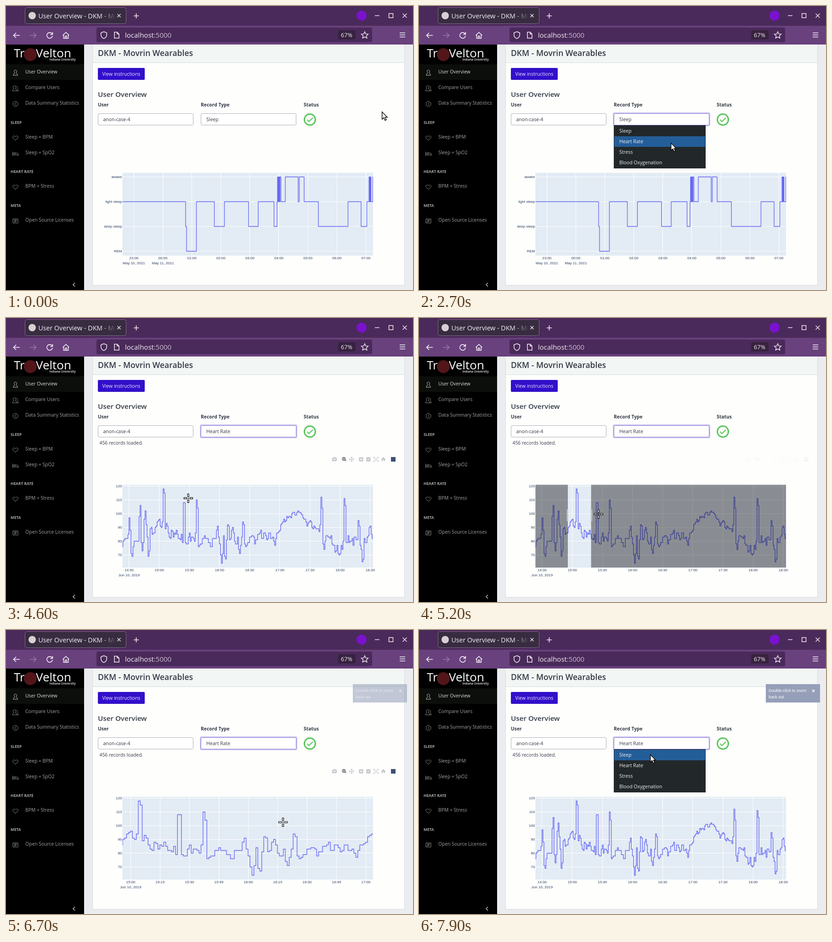
Animation of 886 by 619 pixels, one loop 8 s. Source, as an HTML page with a canvas:

```html
<!DOCTYPE html>
<html lang="en">
<head>
<meta charset="utf-8">
<title>User Overview</title>
<style>
html, body { margin: 0; width: 100%; height: 100%; overflow: hidden; background: #ebecef; }
canvas { display: block; width: 886px; height: 619px; }
</style>
</head>
<body>
<canvas id="stage" width="886" height="619"></canvas>
<script>
const g = document.getElementById('stage').getContext('2d');
const LOOP = 8000;
const UI = '"Open Sans", "Noto Sans", sans-serif';
const PLOT = '"Liberation Sans", Arial, sans-serif';
const TRACE = '#6568f3', INK = '#2a3f5f';
const L = 253.5, R = 799, T = 363.5, B = 544;
const MINUTE = 2.187;

// helpers
function text(s, x, y, size, color, weight = 400, align = 'left', family = UI) {
  g.font = `${weight} ${size}px ${family}`;
  g.fillStyle = color;
  g.textAlign = align;
  g.fillText(s, x, y);
}
function rect(x, y, w, h, color) {
  g.fillStyle = color;
  g.fillRect(x, y, w, h);
}
function box(x, y, w, h, r, fill, stroke, width = 1) {
  g.beginPath();
  g.roundRect(x, y, w, h, r);
  if (fill) { g.fillStyle = fill; g.fill(); }
  if (stroke) { g.strokeStyle = stroke; g.lineWidth = width; g.stroke(); }
}
function disc(x, y, r, color) {
  g.beginPath();
  g.arc(x, y, r, 0, 7);
  g.fillStyle = color;
  g.fill();
}
function draw(d, x, y, color, width = 1.3, fill) {
  const p = new Path2D(d);
  g.save();
  g.translate(x, y);
  if (fill) { g.fillStyle = fill; g.fill(p); }
  if (color) { g.strokeStyle = color; g.lineWidth = width; g.stroke(p); }
  g.restore();
}
const clamp = (v, a = 0, b = 1) => Math.min(b, Math.max(a, v));
const ramp = (t, a, b) => clamp((t - a) / (b - a));
const bell = (x, c, w) => Math.exp(-(((x - c) / w) ** 2));
const pad = n => String(n).padStart(2, '0');
function seeded(s) {
  return () => (s = s * 16807 % 2147483647) / 2147483647;
}

// pointer moves: start, end, x, y
const moves = [
  [100, 500, 768, 170], [600, 1000, 630, 192], [1100, 1200, 557, 251], [1500, 2000, 554, 242],
  [2000, 2300, 552, 268], [2400, 2700, 548, 298], [3000, 3200, 547, 325], [3200, 3300, 545, 297],
  [3600, 4200, 530, 325], [4300, 4900, 324, 430], [5000, 6200, 603, 419],
  [7200, 7700, 506, 252], [7800, 7900, 503, 271]
];
function pointer(t) {
  let x = 818, y = 230;
  for (const [a, b, tx, ty] of moves) {
    const u = 1 - (1 - ramp(t, a, b)) ** 1.5;
    x += (tx - x) * u;
    y += (ty - y) * u;
  }
  return [x, y];
}

// heart rate: slow drift, seeded jitter and sharp peaks given as x, value
const peaks = [
  [269, 97], [275, 69], [292.5, 106], [297, 73], [303.5, 102], [311, 69], [344, 118], [388, 108],
  [416, 110], [424, 78], [461, 91], [470, 64], [478, 67], [484, 92], [494, 90], [509, 71],
  [516.5, 94], [586, 77], [687, 112], [693, 74], [737.5, 111], [768, 95], [777, 65], [793, 91]
];
function heartRate() {
  const rnd = seeded(41), out = [];
  let noise = 0;
  for (let x = L; x < R; x += MINUTE) {
    if (rnd() > .35) noise = .4 * noise + 9 * (rnd() - .5);
    const calm = bell(x, 632, 40);
    let v = 81 + 13 * bell(x, 342, 20) + 19 * calm - 5 * bell(x, 254, 40) - 8 * bell(x, 724, 12);
    v += noise * (1 - .6 * calm);
    for (const [c, top] of peaks) v += (top - v) * clamp(1.5 - Math.abs(x - c) / 2.2);
    out.push([x, Math.round(v)]);
  }
  return out;
}
const bpm = heartRate();

// sleep: from, to, level (0 awake .. 3 REM); light sleep between
const phases = [
  [391, 393, 2], [393, 414.5, 3], [453.5, 475.5, 2], [528, 549, 2], [583.5, 590, 2], [596.5, 598.5, 0],
  [608, 636, 0], [638.5, 649, 0], [680, 744.5, 2], [773, 785.5, 2], [798.5, 799, 0]
];

function grid(xs, ys) {
  rect(L, T, R - L, B - T, '#e3ebf4');
  for (const x of xs) rect(Math.floor(x - .1), T, 1, B - T, '#fff');
  for (const y of ys) rect(L, y - .5, R - L, 1, '#fff');
}
const tick = (s, x, y, align = 'center') => text(s, x, y, 8, INK, 400, align, PLOT);
function trace(points) {
  g.save();
  g.beginPath();
  g.rect(L, T, R - L, B - T);
  g.clip();
  g.beginPath();
  points.forEach(([x, y], i) => {
    if (i) g.lineTo(x, points[i - 1][1]);
    g.lineTo(x, y);
  });
  g.lineTo(R + 1, points[points.length - 1][1]);
  g.strokeStyle = TRACE;
  g.lineWidth = 1.35;
  g.lineJoin = 'round';
  g.stroke();
  g.restore();
}

function sleepChart() {
  const xs = Array.from({ length: 9 }, (_, i) => 278.3 + 63.15 * i);
  const level = i => 372.5 + 54 * i;
  grid(xs, [0, 1, 2, 3].map(level));
  ['awake', 'light sleep', 'deep sleep', 'REM'].forEach((s, i) => tick(s, 252.5, level(i) + 2.5, 'right'));
  xs.forEach((x, i) => tick(pad((23 + i) % 24) + ':00', x, 552));
  tick('May 10, 2021', xs[0], 563);
  tick('May 11, 2021', xs[1], 563);
  const points = [[L, level(1)]];
  phases.forEach(([a, b, v], i) => {
    points.push([a, level(v)]);
    if (phases[i + 1]?.[0] !== b) points.push([b, level(1)]);
  });
  trace(points);
  for (const x of [590.4, 789.6]) rect(x, 372, 5.6, 55, TRACE);
}

function heartChart(a, b, step) {
  const px = x => L + (x - a) * (R - L) / (b - a);
  const py = v => 366.5 + 3 * (120 - v);
  const ticks = [];
  for (let m = 30; m <= 270; m += step) {
    const x = px(268 + MINUTE * (m - 30));
    if (x > L && x < R) ticks.push([x, m]);
  }
  const rows = [120, 110, 100, 90, 80, 70];
  grid(ticks.map(k => k[0]), rows.map(py));
  rows.forEach(v => tick(v, 252.5, py(v) + 2.5, 'right'));
  ticks.forEach(([x, m]) => tick(14 + Math.floor(m / 60) + ':' + pad(m % 60), x, 552));
  tick('Jun 10, 2019', ticks[0][0], 563);
  trace(bpm.map(([x, v]) => [px(x - MINUTE / 2), py(v)]));
}

function selection(x0, x1) {
  const dim = 'rgba(0,0,0,.4)';
  rect(L, T, x0 - L, B - T, dim);
  rect(x1, T, R - x1, B - T, dim);
  for (const x of [x0 - 2.5, x1 + .5]) box(x, 416.5, 2, 27, 0, '#fff', '#777', .8);
}

function modebar(alpha) {
  if (!alpha) return;
  const c = '#c3c6cc', y = 308;
  g.save();
  g.globalAlpha = alpha;
  box(710, y - 3.5, 10, 7.5, 1, c);
  rect(713, y - 5, 4, 2, c);
  disc(715, y, 2, '#fff');
  draw('M3.2-1A3.2 3.2 0 1 1-3.2-1A3.2 3.2 0 1 1 3.2-1M2 1L5 4M-1.5-1h3M0-2.5v3', 735.5, y, '#70757e', 1.7);
  draw('M-5 0H5M0-5V5M-3-1.8L-5 0L-3 1.8M3-1.8L5 0L3 1.8M-1.8-3L0-5L1.8-3M-1.8 3L0 5L1.8 3', 752.5, y, c, 1.2);
  for (const x of [773, 789]) {
    rect(x - 4.5, y - 4.5, 9, 9, c);
    rect(x - 2.5, y - .7, 5, 1.4, '#fff');
  }
  rect(772.3, y - 2.5, 1.4, 5, '#fff');
  draw('M-5-2V-5H-2M2-5H5V-2M5 2V5H2M-2 5H-5V2M-3-3L3 3M3-3L-3 3', 805.5, y, c, 1.2);
  draw('M-5 0L0-5L5 0H3.5V4H1V1H-1V4H-3.5V0Z', 821.5, y, null, 1, c);
  rect(838, y - 5, 10, 10, '#3f4f75');
  g.restore();
}

function notice(alpha) {
  if (!alpha) return;
  g.save();
  g.globalAlpha = alpha;
  rect(755, 118, 118, 40, '#959fb8');
  text('Double-click to zoom', 761, 135, 8.9, '#fff', 400, 'left', PLOT);
  text('back out', 761, 149, 8.9, '#fff', 400, 'left', PLOT);
  draw('M-2.5-2.5L2.5 2.5M2.5-2.5L-2.5 2.5', 858.5, 132.5, '#fff', 1.5);
  g.restore();
}

function browser() {
  const w = '#f4eef6';
  rect(0, 0, 886, 43, '#4a2a5a');
  rect(0, 43, 886, 41, '#69417d');
  box(41.5, 3.5, 220, 35, 4, '#382c40', '#826c8c');
  disc(57, 21, 8, '#d9d0d4');
  const fade = g.createLinearGradient(205, 0, 240, 0);
  fade.addColorStop(0, w);
  fade.addColorStop(1, 'rgba(244,238,246,0)');
  g.save();
  g.beginPath();
  g.rect(66, 5, 173, 32);
  g.clip();
  text('User Overview - DKM - Movrin Wearables', 70.5, 26.5, 14.2, fade);
  g.restore();
  draw('M-3.5-3.5L3.5 3.5M3.5-3.5L-3.5 3.5', 246, 21, w);
  draw('M-5.5 0H5.5M0-5.5V5.5', 283.5, 21.5, w, 1.6);
  disc(774, 21, 11, '#7a12cf');
  draw('M-5 0H5', 808, 21, w, 1.4);
  draw('M-4.5-4.5H4.5V4.5H-4.5Z', 838, 21, w, 1.4);
  draw('M-4.5-4.5L4.5 4.5M4.5-4.5L-4.5 4.5', 868, 21, w, 1.4);

  draw('M7 0H-6M-1-5.5L-6.5 0L-1 5.5', 23, 64, w, 1.7);
  draw('M-7 0H6M1-5.5L6.5 0L1 5.5', 59, 64, '#9678a5', 1.7);
  draw('M5.3-3.2A6.2 6.2 0 1 0 6.2 1M6.3-7V-2H1.3', 95, 64, w, 1.7);
  draw('M-7 0L0-6.5L7 0M-5-1.5V6.5H5V-1.5M-1.5 6V1.5H1.5V6', 130.5, 64, w, 1.6);
  box(197, 47, 600, 32, 4, '#4a2a5a');
  draw('M0-7.5L6.3-5V-1C6.3 3 3.5 6 0 7.5C-3.5 6-6.3 3-6.3-1V-5Z', 213, 63.5, w, 1.5);
  draw('M-5-6.5H1L5-2.5V6.5H-5ZM1-6.5V-2.5H5', 241, 63.5, w, 1.5);
  text('localhost', 259, 69, 15, w);
  const x = 259 + g.measureText('localhost').width;
  text(':5000', x, 69, 15, '#c9b9d1');
  box(723, 53, 38, 20, 3, '#37223f');
  text('67%', 741.5, 68, 12.6, w, 400, 'center');
  draw('M0-7.5L2.2-2.6L7.4-2.1L3.5 1.4L4.6 6.6L0 3.9L-4.6 6.6L-3.5 1.4L-7.4-2.1L-2.2-2.6Z', 781, 63.5, w, 1.4);
  draw('M-6-4.5H6M-6 0H6M-6 4.5H6', 863, 63, w, 1.5);
}

const HEART = 'M0 5.5L-5 .3C-7.5-3-3-6.5 0-2.5C3-6.5 7.5-3 5 .3Z';
const USER = 'M0-6C3.6-6 3.4-.8 1.3.7C3 2 4.5 2 4.8 5.5H-4.8C-4.5 2-3 2-1.3.7C-3.4-.8-3.6-6 0-6Z';
const menu = [
  ['User Overview', 143, USER],
  ['Compare Users', 177, 'M-2-6C1.6-6 1.4-.8-.7.7C1 2 2.5 2 2.8 5.5H-6.5C-6 2-5 2-3.3.7C-5.4-.8-5.6-6-2-6ZM2-5C5.5-5 5 0 3.3 1C5 2 6 2 6.3 5.5H3'],
  ['Data Summary Statistics', 211, 'M5.5 0A5.5 5.5 0 1 1-5.5 0A5.5 5.5 0 1 1 5.5 0M2-3L-1.5 0L2 3'],
  ['Sleep + BPM', 285, HEART],
  ['Sleep + SpO2', 319, 'M-6-4V5M-6 3H6V5M6 3V0L-1-2V3M-6 0H-1M-4-2H-2.5'],
  ['BPM + Stress', 392, HEART],
  ['Open Source Licenses', 466, 'M-5.5-4.5H5.5V4.5H-5.5ZM-3-2H3M-3 0H3M-3 2H1']
];
function sidebar() {
  rect(0, 84, 170, 535, '#000');
  disc(53, 106, 14, '#521619');
  text('Tr', 17, 112, 26, '#fff');
  text('Velton', 65, 112, 26, '#fff');
  text('Indiana University', 94.5, 118.5, 6.5, '#eee', 600);
  rect(0, 127, 170, 34, '#0c0e0b');
  menu.forEach(([s, y, icon], i) => {
    text(s, 42, y + 4, 10.35, i ? '#a3a3a3' : '#dcdcdc');
    draw(icon, 20.5, y + 2.5, i ? '#8c8c8c' : '#c8c8c8', 1);
  });
  [['SLEEP', 257], ['HEART RATE', 364], ['META', 438]].forEach(([s, y]) => text(s, 10, y, 8.4, '#a8a8a8', 700));
  draw('M2-4L-2 0L2 4', 148, 607.5, '#bbb', 1.6);
}

function page(focus, record, loaded) {
  const dark = '#343a46';
  rect(170, 84, 716, 535, '#ebecef');
  rect(188, 84, 680, 525, '#d9dbde');
  rect(189, 84, 678, 524, '#fefefd');
  rect(189, 85, 678, 38, '#f2f6f4');
  rect(189, 123, 678, 1, '#d6dadb');
  text('DKM - Movrin Wearables', 200, 109, 17.5, dark, 600);
  box(200, 135, 102, 26, 2, '#320fca');
  text('View instructions', 251, 151.5, 10.5, '#eceaff', 400, 'center');
  text('User Overview', 200, 197.5, 15.2, dark, 600);
  text('User', 200, 219, 10.35, dark, 700);
  text('Record Type', 424, 219, 10.35, dark, 700);
  text('Status', 648, 219, 10.35, dark, 700);
  box(200.5, 234.5, 207, 25, 2, '#fff', '#aeb0b4');
  text('anon-case-4', 211.5, 251, 10.4, dark);
  if (focus) box(422, 232, 212, 30, 4, '#c9c1f3');
  box(424.5, 234.5, 207, 25, 2, '#fff', focus ? '#8d80cf' : '#aeb0b4');
  text(record, 436, 251, 10.5, dark);
  g.beginPath();
  g.arc(661.5, 247.5, 12, 0, 7);
  g.strokeStyle = '#5bc75c';
  g.lineWidth = 3;
  g.stroke();
  draw('M-6 .5L-2 4.5L6.5-4', 661.5, 247.5, '#5bc75c', 2.2);
  if (loaded) text('456 records loaded.', 203.5, 276, 10.3, dark);
}

function dropdown(y) {
  rect(424, 260, 200, 94, '#22282a');
  const row = clamp(Math.floor((y - 261) / 23), 0, 3);
  rect(425, 261 + 23 * row, 198, 23, '#245e99');
  ['Sleep', 'Heart Rate', 'Stress', 'Blood Oxygenation'].forEach((s, i) => text(s, 436, 276 + 23 * i, 10.5, '#f0f0f0'));
}

function arrow(x, y) {
  draw('M.7 .8V16.8L4.4 13.4L7.2 19.2L10 18L7.3 12.4H12Z', x, y, '#111', 1.5, '#fff');
}
function cross(x, y) {
  const arms = 'M-1.5-9.5h3v6h-3ZM-1.5 3.5h3v6h-3ZM-9.5-1.5h6v3h-6ZM3.5-1.5h6v3h-6Z';
  draw(arms, x, y, '#111', 1.2, '#fff');
  disc(x, y, 1.2, '#111');
}

function render(t) {
  const [x, y] = pointer(t);
  const heart = t >= 4000, zoomed = t >= 6400 && t < 7100;
  const open = t >= 2100 && t < 3600 || t >= 7700;
  page(t >= 2100, t < 3800 ? 'Sleep' : 'Heart Rate', heart);
  if (!heart) sleepChart();
  else if (zoomed) heartChart(324.4, 604, 15);
  else heartChart(L, R, 30);
  // the dragged edge trails the pointer a little
  if (t > 5000 && t < 6400) selection(324, pointer(t - 50)[0]);
  modebar(Math.max(
    Math.min(ramp(t, 3900, 4200), 1 - ramp(t, 5000, 5210)),
    Math.min(ramp(t, 6200, 6500), 1 - ramp(t, 7400, 7700))
  ));
  if (open) dropdown(y);
  sidebar();
  browser();
  notice(ramp(t, 6300, 7000));
  const inPlot = x > L && x < R && y > T && y < B;
  (inPlot ? cross : arrow)(x, y);
}

// the picture advances ten times a second
function loop() {
  const t = performance.now() % LOOP;
  render(Math.floor(t / 100) * 100);
  requestAnimationFrame(loop);
}
loop();
</script>
</body>
</html>
```
